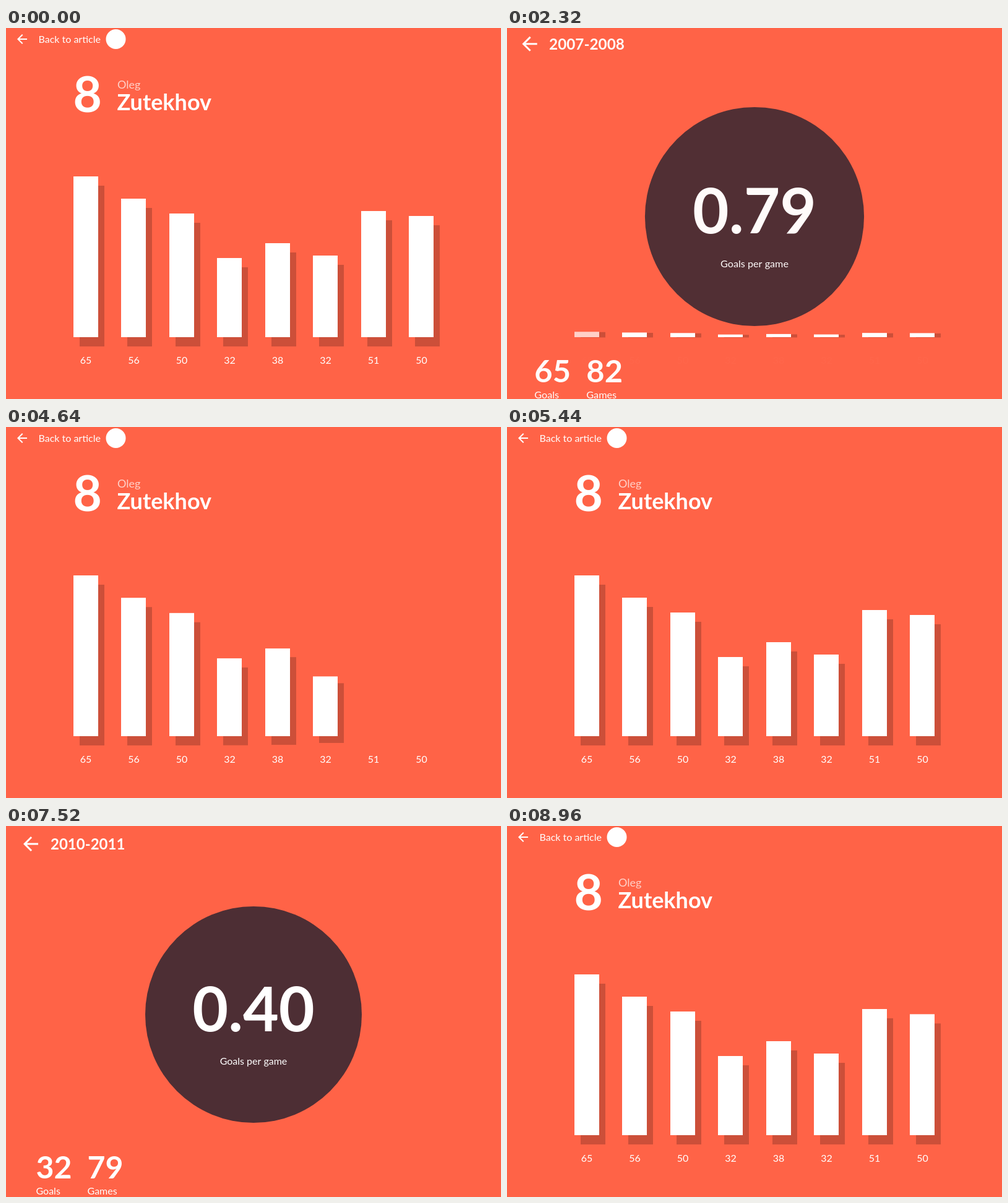
Recreate the animation shown at these times as an HTML page with a canvas. Size 800 px wide and 600 px high, loop 9.6 s.

```html
<!DOCTYPE html>
<html lang="en">
<head>
<meta charset="utf-8">
<title>Goals per season</title>
<style>
html, body { margin: 0; width: 100%; height: 100%; overflow: hidden; background: #ff6347; }
canvas { display: block; width: 800px; height: 600px; }
</style>
</head>
<body>
<canvas id="stage" width="800" height="600"></canvas>
<script>
const W = 800, H = 600, LOOP = 9600, STEP = 80, BASE = 500;
const stage = document.getElementById('stage').getContext('2d');
const layer = document.createElement('canvas');
layer.width = W;
layer.height = H;
const over = layer.getContext('2d');

const heights = [65, 56, 50, 32, 38, 33, 51, 49];
const labels = [65, 56, 50, 32, 38, 32, 51, 50];
const visits = [
  { hover: 1200, open: 2000, close: 4000, bar: 0, season: '2007-2008', rate: '0.79', goals: '65', games: '82' },
  { hover: 5520, open: 5840, close: 7760, bar: 3, season: '2010-2011', rate: '0.40', goals: '32', games: '79' }
];
const arrow = new Path2D('M20 11H7.83l5.59-5.59L12 4l-8 8 8 8 1.41-1.41L7.83 13H20v-2z');

const clamp = x => Math.min(1, Math.max(0, x));
const expo = x => x <= 0 ? 0 : x >= 1 ? 1 : 1 - Math.pow(2, -10 * x);
const glide = (time, delay) => expo((time - delay) / 500);

function text(c, str, x, y, size, bold, align) {
  c.font = (bold ? '700 ' : '400 ') + size + 'px Lato, sans-serif';
  c.textAlign = align || 'left';
  c.fillText(str, x, y);
}

function drawArrow(c, x, y, scale) {
  c.save();
  c.translate(x, y);
  c.scale(scale, scale);
  c.fill(arrow);
  c.restore();
}

// Everything the list view needs to know at time t
function stateAt(t) {
  const visit = t < visits[0].close + 1300 ? visits[0] : visits[1];
  const s = {
    visit, detail: 0, head: 1, title: 1, label: 1,
    bars: heights.map(() => 1), hover: 0, wrap: false
  };
  if (t < visit.close) {
    s.hover = clamp((t - visit.hover) / 160);
    if (t >= visit.open) {
      const a = t - visit.open;
      s.detail = glide(a, 50);
      s.head = s.title = s.label = 1 - s.detail;
      s.bars.fill(1 - glide(a, 75));
      s.wrap = true;
    }
  } else {
    const e = t - visit.close;
    s.detail = Math.pow(1 - clamp((e - 50) / 500), 1.85);
    s.head = s.label = glide(e, 0);
    s.title = glide(e, 45);
    s.bars = heights.map((_, i) => glide(e, 45 + 100 * i));
  }
  return s;
}

function drawHead(c, s) {
  if (s.head < 0.01) return;
  c.save();
  c.globalAlpha = s.head;
  c.translate(0, -40 * (1 - s.head));
  c.beginPath();
  c.rect(0, 0, W, 35.5);
  c.clip();
  drawArrow(c, 14, 6, 1);
  if (s.wrap) {
    text(c, 'Back to', 52.5, 12, 16);
    text(c, 'article', 52.5, 36, 16);
  } else {
    text(c, 'Back to article', 52.5, 24, 16);
  }
  c.beginPath();
  c.arc(177.5, 18, 16, 0, 2 * Math.PI);
  c.fill();
  c.restore();
}

function drawTitle(c, s) {
  c.save();
  c.translate(0, -150 * (1 - s.title));
  text(c, '8', 108.5, 136, 80, true);
  text(c, 'Zutekhov', 179.5, 133, 36, true);
  c.globalAlpha = 0.7;
  text(c, 'Oleg', 180, 98, 18);
  c.restore();
}

function drawBars(c, s) {
  heights.forEach((value, i) => {
    const x = Math.floor(109 + 77.5 * i), h = 4 * value, k = s.bars[i];
    const fade = i === s.visit.bar ? 1 - 0.3 * s.hover : 1;
    c.save();
    c.translate(x, BASE);
    c.scale(1, k);
    // The shadow shows only outside the bar
    c.fillStyle = 'rgba(0,0,0,.2)';
    c.fillRect(40, 15 - h, 10, h);
    c.fillRect(10, 0, 30, 15);
    c.fillStyle = '#fff';
    c.globalAlpha = fade;
    c.fillRect(0, -h, 40, h);
    c.restore();
    c.globalAlpha = fade * s.label;
    text(c, labels[i], 129 + 77.5 * i, 543, 16, false, 'center');
    c.globalAlpha = 1;
  });
}

function drawDetail(c, s) {
  const v = s.visit, p = s.detail, zoom = 1.5 - 0.5 * p;
  c.clearRect(0, 0, W, H);
  c.save();
  c.translate(400, 305);
  c.scale(zoom, zoom);
  c.translate(-400, -305);
  c.fillStyle = '#4d2e34';
  c.beginPath();
  c.arc(400, 305, 175, 0, 2 * Math.PI);
  c.fill();
  c.fillStyle = '#fff';
  drawArrow(c, 22 + 35 * (1 - p), 11, 1.5);
  text(c, v.season, 72, 38, 24, true);
  text(c, v.rate, 400, 332, 100, true, 'center');
  text(c, 'Goals per game', 400, 386, 16, false, 'center');
  text(c, v.goals, 48.5, 570, 50, true);
  text(c, v.games, 131.5, 570, 50, true);
  text(c, 'Goals', 48.5, 596, 16);
  text(c, 'Games', 131.5, 596, 16);
  c.restore();
}

function draw(t) {
  const s = stateAt(t);
  stage.fillStyle = '#ff6347';
  stage.fillRect(0, 0, W, H);
  stage.fillStyle = '#fff';
  drawHead(stage, s);
  drawTitle(stage, s);
  drawBars(stage, s);
  if (s.detail > 0) {
    drawDetail(over, s);
    stage.globalAlpha = s.detail;
    stage.drawImage(layer, 0, 0);
    stage.globalAlpha = 1;
  }
}

const began = performance.now();
function tick() {
  const t = (performance.now() - began) % LOOP;
  draw(Math.floor(t / STEP) * STEP);
  requestAnimationFrame(tick);
}
tick();
</script>
</body>
</html>
```
